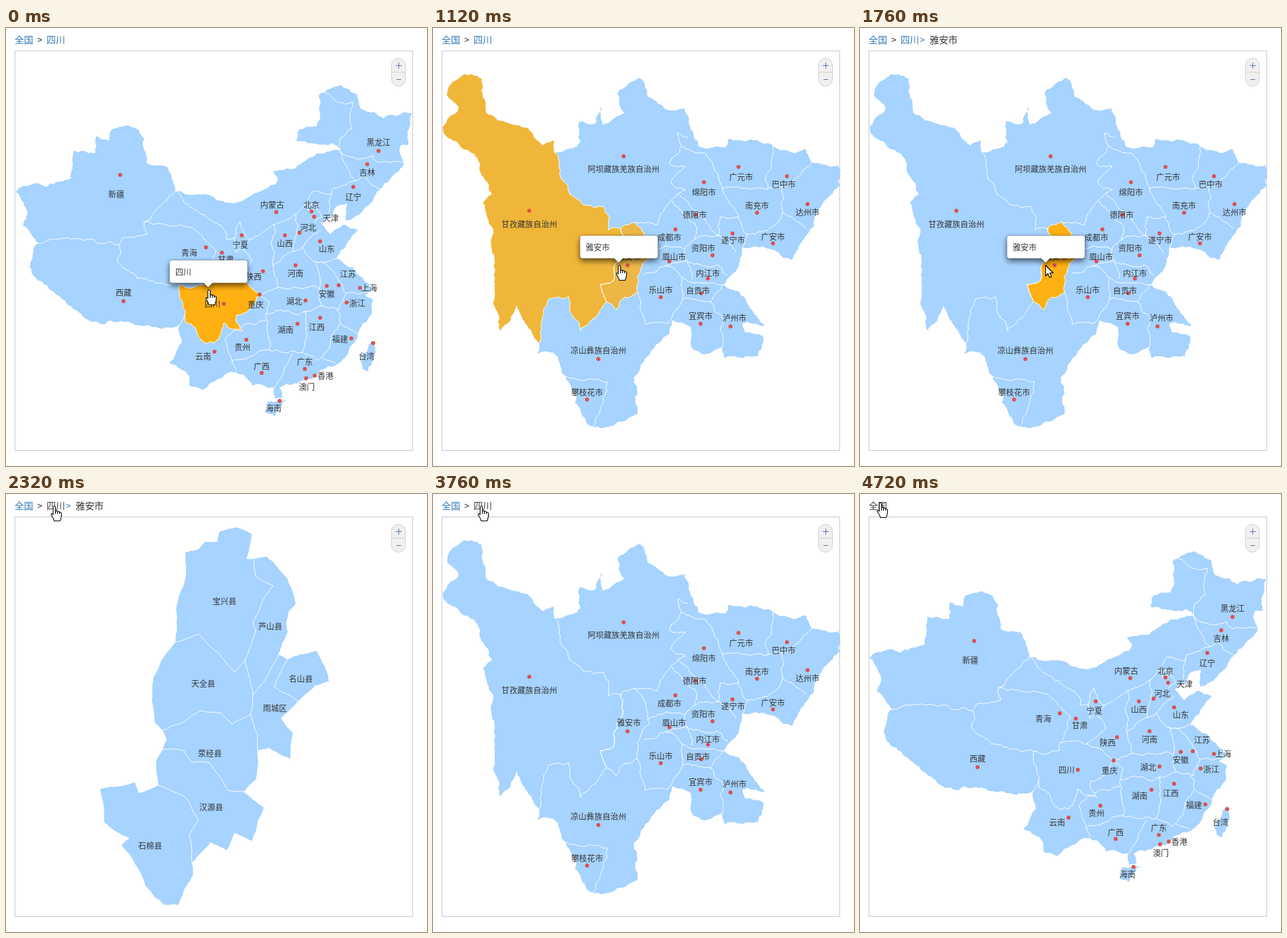
Recreate the animation shown at these times as an HTML page. Size 634 px wide and 659 px high, loop 5.6 s.

```html
<!DOCTYPE html>
<html lang="zh-CN">
<head>
<meta charset="utf-8">
<title>地图下钻</title>
<style>
html, body { margin: 0; width: 100%; height: 100%; overflow: hidden; background: #fff; }
svg { display: block; width: 634px; height: 659px; font: 12px "Noto Sans CJK SC", "Noto Sans CJK", "Noto Sans CJK JP", sans-serif; fill: #333; }
.land { fill: #a6d3ff; }
.hot { fill: #ffb012; }
.line { fill: none; stroke: #fff; stroke-linejoin: round; }
.dot { fill: #d9534f; }
.name { text-anchor: middle; }
.crumb { font-size: 14px; }
.link { fill: #337ab7; }
.tip { fill: #fff; filter: drop-shadow(0 4px 4px rgba(0,0,0,.45)) drop-shadow(0 0 1px rgba(0,0,0,.5)); }
.cursor { fill: #fff; stroke: #000; stroke-width: 1.1; stroke-linejoin: round; }

#country, #province, #county, #sichuan, #ganzi, #yaan, #tip, #tipA, #tipB, #tipC,
#hand, #arrow, #pointer, #crumb1, #crumb2, #crumb3 { animation: 5.6s step-end infinite; }
#country { animation-name: country; }
#province { animation-name: province; }
#county { animation-name: county; }
#sichuan, #tipA { animation-name: first; }
#ganzi { animation-name: ganzi; }
#yaan { animation-name: yaan; }
#tip { animation-name: tip; }
#tipB { animation-name: tipB; }
#tipC { animation-name: tipC; }
#hand { animation-name: hand; }
#arrow { animation-name: arrow; }
#pointer { animation-name: pointer; }
#crumb1 { animation-name: crumb1; }
#crumb2 { animation-name: crumb2; }
#crumb3 { animation-name: crumb3; }

@keyframes country { 0% { opacity: 1 } 2.857% { opacity: 0 } 84.285%, 100% { opacity: 1 } }
@keyframes province { 0% { opacity: 0 } 2.857% { opacity: 1 } 32.857% { opacity: 0 } 67.142% { opacity: 1 } 84.285%, 100% { opacity: 0 } }
@keyframes county { 0% { opacity: 0 } 32.857% { opacity: 1 } 67.142%, 100% { opacity: 0 } }
@keyframes first { 0% { opacity: 1 } 2.857%, 100% { opacity: 0 } }
@keyframes ganzi {
  0% { opacity: 0 } 11.428% { opacity: 1 }
  20% { opacity: 1; animation-timing-function: steps(6, start) } 28.571%, 100% { opacity: 0 }
}
@keyframes yaan {
  0% { opacity: 0 } 2.857% { opacity: 1 } 11.428% { opacity: .2 } 12.857% { opacity: 0 }
  20% { opacity: .75; animation-timing-function: steps(6, start) } 28.571% { opacity: 1 } 32.857%, 100% { opacity: 0 }
}
@keyframes tip { 0% { opacity: 1 } 32.857%, 100% { opacity: 0 } }
@keyframes tipB { 0% { opacity: 0 } 11.428% { opacity: 1 } 20%, 100% { opacity: 0 } }
@keyframes tipC { 0% { opacity: 0 } 2.857% { opacity: 1 } 11.428% { opacity: 0 } 20% { opacity: 1 } 32.857%, 100% { opacity: 0 } }
@keyframes hand { 0% { opacity: 1 } 31.428% { opacity: 0 } 41.428% { opacity: 1 } 80% { opacity: 0 } 82.857%, 100% { opacity: 1 } }
@keyframes arrow { 0% { opacity: 0 } 31.428% { opacity: 1 } 41.428% { opacity: 0 } 80% { opacity: 1 } 82.857%, 100% { opacity: 0 } }
@keyframes pointer {
  0% { transform: translate(306px, 394px) } 11.428% { transform: translate(274px, 353px) }
  15.714% { transform: translate(277px, 355px) } 17.142% { transform: translate(281px, 357px) }
  35.714% { transform: translate(281px, 357px); animation-timing-function: steps(5, start) }
  42.857% { transform: translate(73px, 18px) }
  80% { transform: translate(73px, 18px); animation-timing-function: steps(3, start) }
  84.285%, 100% { transform: translate(31px, 13px) }
}
@keyframes crumb1 { 0% { fill: #337ab7 } 82.857%, 100% { fill: #444 } }
@keyframes crumb2 { 0% { opacity: 1; fill: #337ab7 } 41.428% { opacity: 1; fill: #444 } 80% { opacity: 1; fill: #337ab7 } 82.857%, 100% { opacity: 0 } }
@keyframes crumb3 { 0% { opacity: 0 } 30% { opacity: 1 } 50%, 100% { opacity: 0 } }
</style>
</head>
<body>
<svg viewBox="0 0 634 659">
  <g class="crumb">
    <text id="crumb1" class="link" x="13" y="23">全国</text>
    <g id="crumb2" class="link"><text x="47" y="23" style="fill:#333">&gt;</text><text x="61" y="23">四川</text></g>
    <g id="crumb3"><text class="link" x="90" y="23">&gt;</text><text x="105" y="23">雅安市</text></g>
  </g>
  <g id="country"></g>
  <g id="province"></g>
  <g id="county"></g>
  <rect x="13.5" y="34.5" width="599" height="601" fill="none" stroke="#c8c8c8"/>
  <g fill="none">
    <rect x="580.5" y="45.5" width="21" height="42" rx="10.5" fill="#f1efef" stroke="#d2d2d2"/>
    <path d="M581 66.5h20" stroke="#d2d2d2"/>
    <path d="M587 56.5h9M591.5 52v9M588 77.5h7" stroke="#5577b5"/>
  </g>
  <g id="pointer">
    <g id="tip">
      <g class="tip"><rect x="-59.5" y="-44.5" width="117" height="34" rx="4"/><path d="M-8.5-11l7 7 7-7z"/></g>
      <text id="tipA" x="-51" y="-22">四川</text>
      <text id="tipB" x="-51" y="-22">甘孜藏族自治州</text>
      <text id="tipC" x="-51" y="-22">雅安市</text>
    </g>
    <g id="hand" class="cursor">
      <path d="M-2 1.5Q-.2-1.5 1.5 1.5V8Q4-6 4.600 8.600Q7 7 7.600 9.600Q10 9 10.500 11V15Q10 18 8.500 22.500H-.5Q-1 19-5 13.500Q-5 10-2 13z" style="display:none"/>
      <path d="M-2 1.5Q-.2-1.5 1.5 1.5V8Q4 6 4.6 8.6Q7 7 7.6 9.6Q10 9 10.5 11V15Q10 18 8.5 22.5H-.5Q-1 19-5 13.5Q-5 10-2 13z"/>
      <path d="M1.5 8v4m3-3v3m3-2v2" fill="none"/>
    </g>
    <path id="arrow" class="cursor" d="M-1.5 0v16l3.5-3.5 2.5 6 2.800-1.200-2.500-5.800h5z"/>
  </g>
</svg>
<script>
const hash = (x, y) => {
  const n = Math.sin(x * 12.9898 + y * 78.233) * 43758.5453;
  return n - Math.floor(n) - .5;
};

// Midpoint displacement; it depends only on the two ends, so shared borders agree.
function split(a, b, rough, out) {
  const len = Math.hypot(b[0] - a[0], b[1] - a[1]);
  if (len > 4) {
    const x = (a[0] + b[0]) / 2, y = (a[1] + b[1]) / 2, r = Math.min(len * rough, 7);
    const m = [x + hash(x, y) * r, y + hash(y + 7, x) * r];
    split(a, m, rough, out);
    split(m, b, rough, out);
  } else out.push(b);
}

function trace(text, rough, closed) {
  const pts = text.trim().split(/\s*,\s*/).map(p => p.split(' ').map(Number));
  if (closed) pts.push(pts[0]);
  const out = [pts[0]];
  for (let i = 1; i < pts.length; i++) split(pts[i - 1], pts[i], rough, out);
  return 'M' + out.map(p => p[0].toFixed(1) + ' ' + p[1].toFixed(1)).join('L') + (closed ? 'z' : '');
}

class Atlas {
  constructor(id, rough) {
    this.rough = rough;
    this.layers = ['land', 'hot', 'line', 'dot', 'name'].map(() => document.createElementNS('http://www.w3.org/2000/svg', 'g'));
    document.getElementById(id).append(...this.layers);
  }
  add(layer, html) { this.layers[layer].insertAdjacentHTML('beforeend', html); }
  land(...parts) { this.add(0, `<path class="land" d="${trace(parts.join(), this.rough, true)}"/>`); }
  hot(id, ...parts) {
    const d = trace(parts.join(), this.rough, true);
    this.add(1, `<path class="hot" id="${id}" d="${d}"/>`);
    this.add(2, `<path class="line" d="${d}"/>`);
  }
  line(text) { this.add(2, `<path class="line" d="${trace(text, this.rough)}"/>`); }
  spot(name, x, y, dx, dy) {
    if (dx) this.add(3, `<circle class="dot" cx="${dx}" cy="${dy}" r="3"/>`);
    this.add(4, `<text class="name" x="${x}" y="${y + 4.5}">${name}</text>`);
  }
}

const cn = new Atlas('country', .3);
const northWest = '14 246,44 234,60 239,98 226,101 184,134 188,136 163,155 170,160 152,184 146,208 166,212 203,244 211,255 244,308 252,342 264,384 246,410 229,402 215,434 212,452 199,503 184';
const northEast = '490 173,438 170,443 152,468 148,471 101,504 86,528 99,534 121,568 136,612 128,606 176,594 177,600 204,580 225,541 270,512 290,513 264,474 294,488 310';
const seaboard = '508 296,531 304,497 347,521 360,550 394,541 402,552 408,545 438,524 474,506 500,452 530,412 542,417 555,405 558,404 541,371 538,362 527';
const southWest = '336 518,297 545,276 538,276 524,246 504,264 475,262 446,226 450,158 440,148 446,118 436,66 394,36 360,48 324,26 298,32 281';
cn.land(northWest, northEast, seaboard, southWest);
cn.land('550 471,555 474,545 517,534 502');
cn.land('394 562,423 560,404 584,390 578');
cn.hot('sichuan', '262 387,283 390,300 386,302 374,330 372,368 390,382 402,369 420,347 432,357 456,328 444,314 474,299 474,285 451,270 442');
cn.line('48 324,106 317,170 326,176 316,212 310,208 292,238 262,255 244');
cn.line('208 292,282 301,316 334,302 374');
cn.line('170 326,168 352,198 377,262 387');
cn.line('270 430,262 446');
cn.line('255 244,284 274,310 290,326 300,332 318,344 316');
cn.line('344 316,352 291,368 318,346 338,344 316');
cn.line('356 333,370 352,341 376');
cn.line('368 318,404 296,402 358,410 390,382 402');
cn.line('404 296,436 280,433 336,402 358');
cn.line('436 280,462 246,490 250,492 242,526 230,508 200,503 184');
cn.line('503 184,504 166,520 152,523 112,500 112,480 97');
cn.line('503 184,526 196,552 192,562 203,600 204');
cn.line('526 230,536 222,562 242');
cn.line('490 250,486 278');
cn.line('458 278,454 264,470 266,458 278');
cn.line('468 268,476 284,464 292');
cn.line('433 336,450 324,474 304');
cn.line('446 330,456 344,474 352,497 347');
cn.line('466 350,472 392,410 390');
cn.line('474 352,500 376,512 400,545 398');
cn.line('512 400,502 424,476 418,472 392');
cn.line('476 418,440 432,414 424,392 430');
cn.line('382 402,396 412,392 440,353 450');
cn.line('394 440,396 484,446 488,452 424');
cn.line('446 488,470 500,504 444,498 424');
cn.line('504 444,532 462');
cn.line('476 496,496 504');
cn.line('432 490,414 526,404 541');
cn.line('396 484,340 502,330 470,353 452');
cn.line('340 502,346 516');
cn.spot('新疆', 166, 250, 172, 221);
cn.spot('西藏', 177, 398, 177, 411);
cn.spot('青海', 276, 338, 301, 330);
cn.spot('甘肃', 331, 348, 325, 338);
cn.spot('宁夏', 353, 326, 355, 312);
cn.spot('内蒙古', 401, 266, 407, 277);
cn.spot('黑龙江', 561, 172, 561, 185);
cn.spot('吉林', 544, 217, 544, 205);
cn.spot('辽宁', 523, 254, 523, 239);
cn.spot('北京', 460, 266, 460, 276);
cn.spot('天津', 489, 286, 464, 284);
cn.spot('河北', 455, 300, 442, 308);
cn.spot('山西', 420, 324, 420, 312);
cn.spot('山东', 483, 332, 473, 321);
cn.spot('陕西', 373, 374, 387, 366);
cn.spot('河南', 436, 369, 436, 357);
cn.spot('江苏', 515, 370, 501, 387);
cn.spot('安徽', 483, 400, 483, 388);
cn.spot('上海', 547, 391, 533, 391);
cn.spot('浙江', 529, 414, 513, 413);
cn.spot('重庆', 376, 416, 382, 401);
cn.spot('湖北', 434, 411, 451, 410);
cn.spot('四川', 311, 415, 328, 415);
cn.spot('湖南', 421, 454, 439, 445);
cn.spot('江西', 468, 450, 473, 436);
cn.spot('福建', 503, 468, 520, 467);
cn.spot('贵州', 356, 480, 362, 469);
cn.spot('云南', 297, 494, 314, 487);
cn.spot('广西', 385, 509, 385, 519);
cn.spot('广东', 450, 502, 450, 513);
cn.spot('香港', 481, 523, 465, 523);
cn.spot('澳门', 453, 540, 452, 527);
cn.spot('台湾', 543, 494, 553, 474);
cn.spot('海南', 403, 572, 412, 561);

const sc = new Atlas('province', .3);
const ganziOuter = '160 474,143 452,126 418,102 457,91 410,90 310,75 262,88 250,62 190,20 164,14 150,38 120,21 102,25 86,46 69,74 76,84 130,150 158,165 176,182 169,183 187';
const ganziEast = '190 208,206 250,226 266,256 268,266 284,264 304,283 302';
const ganziYaan = '284 336,272 362,272 380,252 386,262 412';
const ganziSouth = '236 442,222 456,208 430,204 404,174 408,164 440';
const yaanEast = '276 424,288 405,308 398,308 376,326 346,318 308,304 292,290 296,283 302';
const north = '222 172,220 140,244 144,254 118,256 146,288 128,278 98,310 75,324 104,350 122,380 120,392 158,400 178,440 180,444 168,480 168,512 178,542 188,560 182,570 202,610 206';
const east = '612 238,588 262,574 298,540 349,506 332,466 330,462 352,438 386,462 398,476 418,499 448,466 444,470 458,497 464,490 494,440 497,436 480,404 490';
const south = '388 476,388 450,360 440,354 462,336 476,302 526,308 580,272 598,240 600,214 564,200 524,180 488,157 490';
sc.land(ganziOuter, north, east, south);
sc.hot('ganzi', ganziOuter, ganziEast, ganziYaan, ganziSouth);
sc.hot('yaan', ganziYaan, yaanEast);
sc.line('384 164,368 158,374 178,356 204,380 208,358 232,380 244,350 270,338 296,304 292');
sc.line('374 178,408 188,430 220,436 242,504 242,502 220,512 178');
sc.line('504 242,538 238,570 202');
sc.line('526 240,526 278,516 296,474 310,466 330');
sc.line('526 278,562 302');
sc.line('436 242,460 284,474 310');
sc.line('460 284,432 284,430 312,456 338');
sc.line('370 250,404 284,430 312');
sc.line('360 260,398 300,394 318,430 312');
sc.line('394 318,378 340,390 354,428 356,444 372');
sc.line('322 340,350 328,378 332');
sc.line('318 370,350 358,384 352,390 378');
sc.line('350 358,376 376,376 408,354 444,320 446,308 398');
sc.line('376 376,438 386,418 412,376 408');
sc.line('418 412,436 434,436 480');
sc.line('200 524,230 530,262 532,256 560,240 600');
sc.spot('甘孜藏族自治州', 145, 295, 145, 275);
sc.spot('阿坝藏族羌族自治州', 287, 212, 287, 193);
sc.spot('绵阳市', 408, 247, 408, 232);
sc.spot('广元市', 464, 224, 460, 209);
sc.spot('巴中市', 528, 235, 533, 223);
sc.spot('南充市', 488, 267, 488, 278);
sc.spot('达州市', 564, 277, 564, 265);
sc.spot('德阳市', 394, 281, 396, 281);
sc.spot('成都市', 356, 315, 365, 303);
sc.spot('遂宁市', 452, 319, 451, 309);
sc.spot('广安市', 512, 314, 512, 324);
sc.spot('资阳市', 407, 331, 421, 342);
sc.spot('眉山市', 363, 344, 356, 351);
sc.spot('内江市', 414, 369, 414, 377);
sc.spot('雅安市', 295, 344, 293, 357);
sc.spot('乐山市', 343, 394, 343, 405);
sc.spot('自贡市', 399, 395, 404, 399);
sc.spot('宜宾市', 403, 433, 403, 445);
sc.spot('泸州市', 454, 436, 448, 449);
sc.spot('凉山彝族自治州', 249, 485, 249, 498);
sc.spot('攀枝花市', 232, 548, 232, 559);

const ya = new Atlas('county', .1);
const right = '255 223,256 172,270 128,270 88,288 84,299 72,318 72,322 56,346 50,370 60,362 98,392 94,424 128,436 166,426 176,422 192,424 208,410 242,424 249,468 236,486 282,466 288,440 312,414 337,432 360,428 398,396 382,379 386';
const left = '376 430,358 448,388 472,380 490,370 522,344 510,332 536,308 524,280 555,282 572,260 618,238 618,210 590,194 556,174 528,186 518,148 494,142 444,194 434,200 450,230 438,226 402,236 384,242 370,236 356,224 344,222 276,234 250';
ya.land(right, left);
ya.line('255 223,290 211,344 268,360 250');
ya.line('374 97,376 124,402 138,372 192,376 206,360 250,372 302,410 242');
ya.line('372 302,368 332');
ya.line('424 249,404 290,440 312');
ya.line('236 356,294 326,324 330,340 346,368 332,379 362,379 386');
ya.line('236 384,268 386,280 404,306 404,334 446,358 448');
ya.line('230 438,270 456,290 490,276 514,280 555');
ya.spot('宝兴县', 329, 161);
ya.spot('芦山县', 398, 199);
ya.spot('名山县', 444, 278);
ya.spot('天全县', 297, 285);
ya.spot('雨城区', 405, 322);
ya.spot('荥经县', 307, 390);
ya.spot('汉源县', 309, 471);
ya.spot('石棉县', 217, 529);
</script>
</body>
</html>
```
